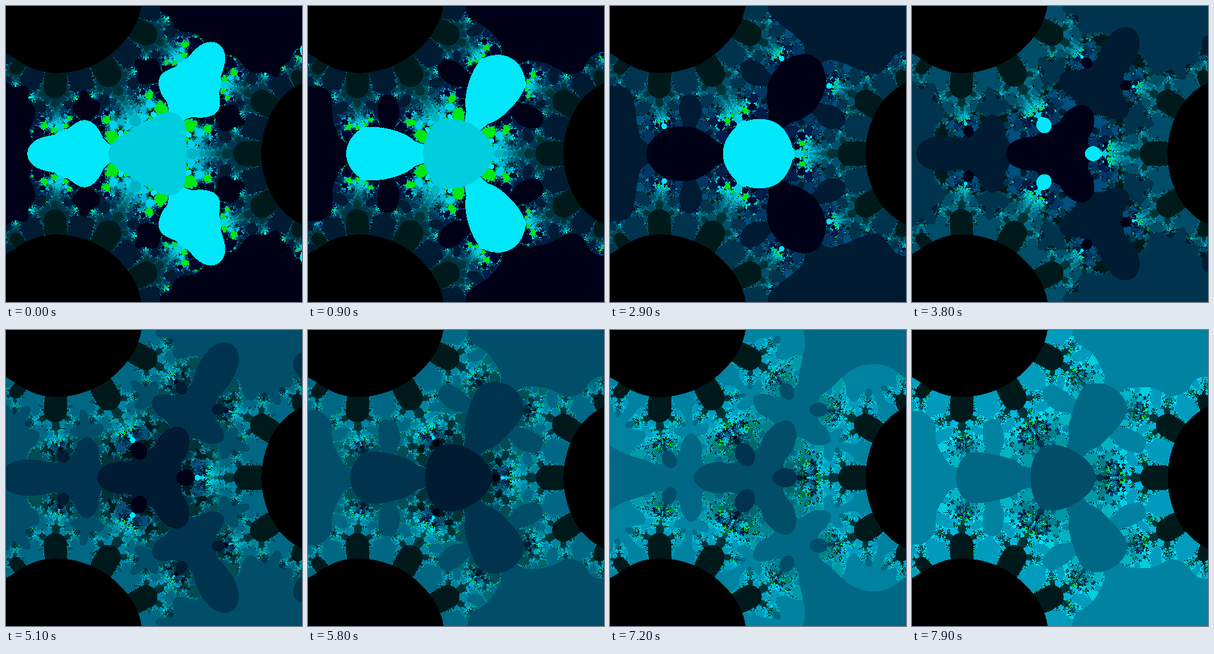
Animation, 450 px wide and 450 px high, one loop 8000 ms. Source, as an HTML page with a canvas:

```html
<!DOCTYPE html>
<html lang="en">
<head>
<meta charset="utf-8">
<title>Julia set of exp(z³) + c</title>
<style>
  html, body { margin: 0; width: 100%; height: 100%; overflow: hidden; background: #000; }
  canvas { display: block; width: 450px; height: 450px; }
</style>
</head>
<body>
<canvas id="stage" width="450" height="450"></canvas>
<script>
const SIZE = 450, MID_X = 225, MID_Y = 224, UNIT = 150;
const STEP_MS = 100, STEPS = 80;
const BAILOUT = 9, MAX_COUNT = 120, COLORS = 23;
const ROWS = SIZE - MID_Y;

const ctx = document.getElementById('stage').getContext('2d');
const image = ctx.createImageData(SIZE, SIZE);
const pixels = new Uint32Array(image.data.buffer);

// c swings slowly along the real axis; the loop covers part of one swing.
const parameterAt = step => -0.5943 - 0.0218 * Math.sin(0.019 * (step - 34));

// Green and blue climb at slightly different rates, wrap around and then repeat.
const palette = Uint32Array.from({ length: MAX_COUNT + 1 }, (_, n) => {
  if (n === 0 || n === MAX_COUNT) return 0xff000000;
  const shade = (n - 1) % COLORS + 1;
  const green = Math.round(25.7 * shade) & 255;
  const blue = Math.round(27.8 * shade) & 255;
  return (0xff000000 | (blue << 16) | (green << 8)) >>> 0;
});

// exp(z³) of every pixel in the lower half; it does not depend on c.
const firstRe = new Float64Array(ROWS * SIZE);
const firstIm = new Float64Array(ROWS * SIZE);
for (let row = 0, i = 0; row < ROWS; row++) {
  for (let col = 0; col < SIZE; col++, i++) {
    const x = (col - MID_X) / UNIT, y = row / UNIT;
    const m = Math.exp(x * (x * x - 3 * y * y));
    const a = y * (3 * x * x - y * y);
    firstRe[i] = m * Math.cos(a);
    firstIm[i] = m * Math.sin(a);
  }
}

function escapeCount(x, y, c) {
  let n = 0;
  while (x * x + y * y <= BAILOUT && n < MAX_COUNT) {
    const xx = x * x, yy = y * y;
    const m = Math.exp(x * (xx - 3 * yy));
    const a = y * (3 * xx - yy);
    x = m * Math.cos(a) + c;
    y = m * Math.sin(a);
    n++;
  }
  return n;
}

const cache = [];
function countsAt(step) {
  if (!cache[step]) {
    const c = parameterAt(step);
    const counts = new Uint8Array(ROWS * SIZE);
    for (let i = 0; i < counts.length; i++) {
      counts[i] = escapeCount(firstRe[i] + c, firstIm[i], c);
    }
    cache[step] = counts;
  }
  return cache[step];
}

// The set is symmetric about the real axis, so the upper half mirrors the lower.
function draw(step) {
  const counts = countsAt(step);
  for (let row = 0, i = 0; row < ROWS; row++) {
    const below = (MID_Y + row) * SIZE;
    const above = (MID_Y - row) * SIZE;
    for (let col = 0; col < SIZE; col++, i++) {
      const color = palette[counts[i]];
      pixels[below + col] = color;
      if (above >= 0) pixels[above + col] = color;
    }
  }
  ctx.putImageData(image, 0, 0);
}

let shown = -1;
const start = performance.now();
function tick() {
  const elapsed = Math.max(0, performance.now() - start);
  const step = Math.floor(elapsed / STEP_MS) % STEPS;
  if (step !== shown) {
    draw(step);
    shown = step;
  }
  requestAnimationFrame(tick);
}
tick();
</script>
</body>
</html>
```
